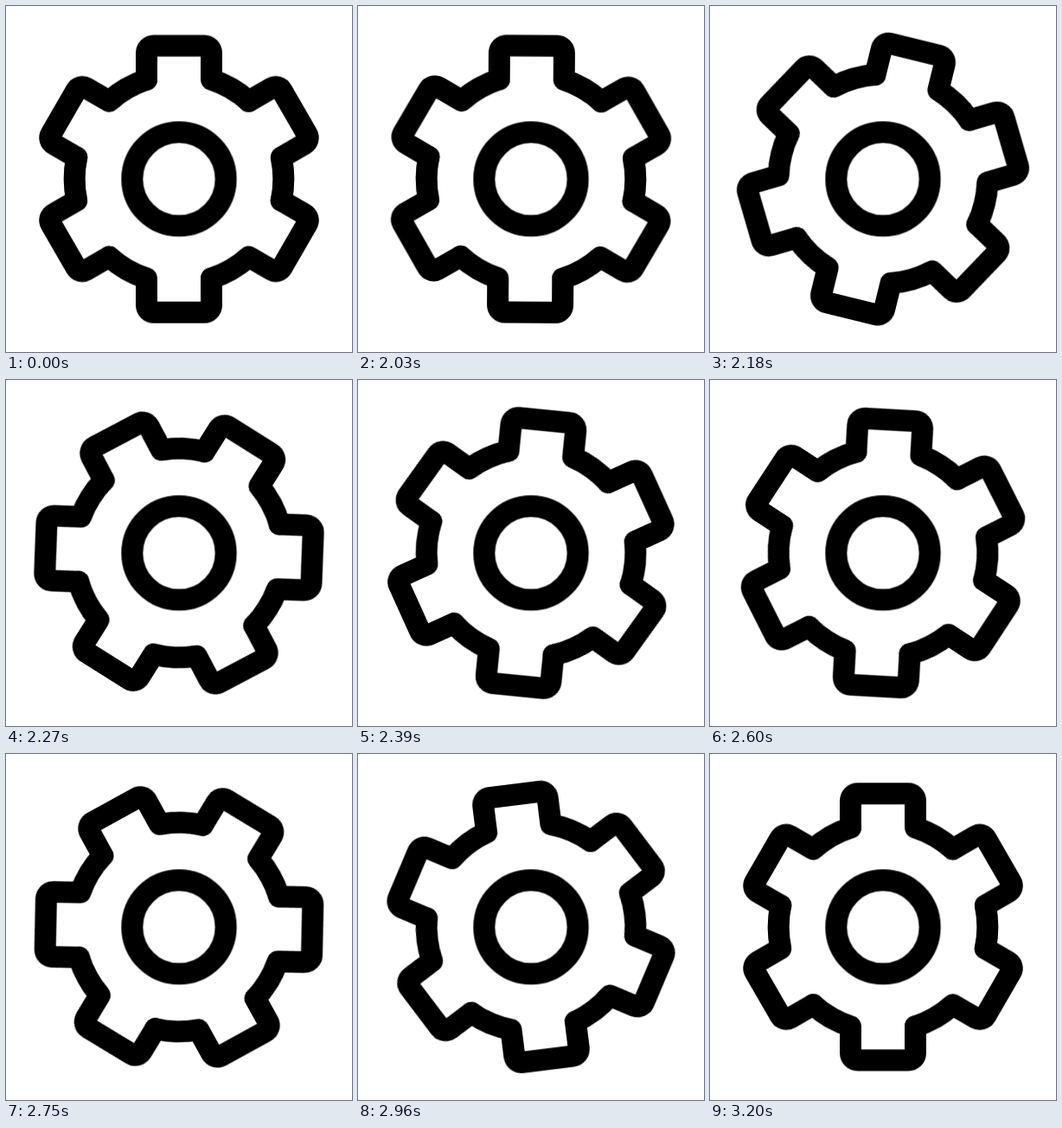
Write an HTML page without scripts that moves like this. It is 400 px wide and 400 px high and loops after 3230 ms.

```html
<!DOCTYPE html>
<html lang="en">
<head>
<meta charset="utf-8">
<title>Turning gear</title>
<style>
  html, body {
    margin: 0;
    width: 100%;
    height: 100%;
    overflow: hidden;
    background: #fff;
  }
  svg {
    display: block;
    width: 100%;
    height: 100%;
    fill: none;
    stroke: #000;
    stroke-width: 1.5;
    stroke-linecap: round;
    stroke-linejoin: round;
  }
  .gear {
    animation: turn 3230ms infinite;
  }
  /* Rest for 2000 ms, then a half turn until 3200 ms */
  @keyframes turn {
    0% { transform: rotate(0deg); }
    61.92% {
      transform: rotate(0deg);
      animation-timing-function: cubic-bezier(.338, 0, .38, 1);
    }
    99.07%, 100% { transform: rotate(180deg); }
  }
</style>
</head>
<body>
<svg viewBox="-12 -12 24 24">
  <defs>
    <!-- One tooth and the rim up to the next -->
    <path id="tooth" d="M-2.25-6.892V-8.75a.5.5 0 0 1 .5-.5h3.5a.5.5 0 0 1 .5.5V-6.892A7.25 7.25 0 0 1 4.844-5.394"/>
  </defs>
  <g class="gear">
    <use href="#tooth"/>
    <use href="#tooth" transform="rotate(60)"/>
    <use href="#tooth" transform="rotate(120)"/>
    <use href="#tooth" transform="rotate(180)"/>
    <use href="#tooth" transform="rotate(240)"/>
    <use href="#tooth" transform="rotate(300)"/>
  </g>
  <circle r="3.25"/>
</svg>
</body>
</html>
```
